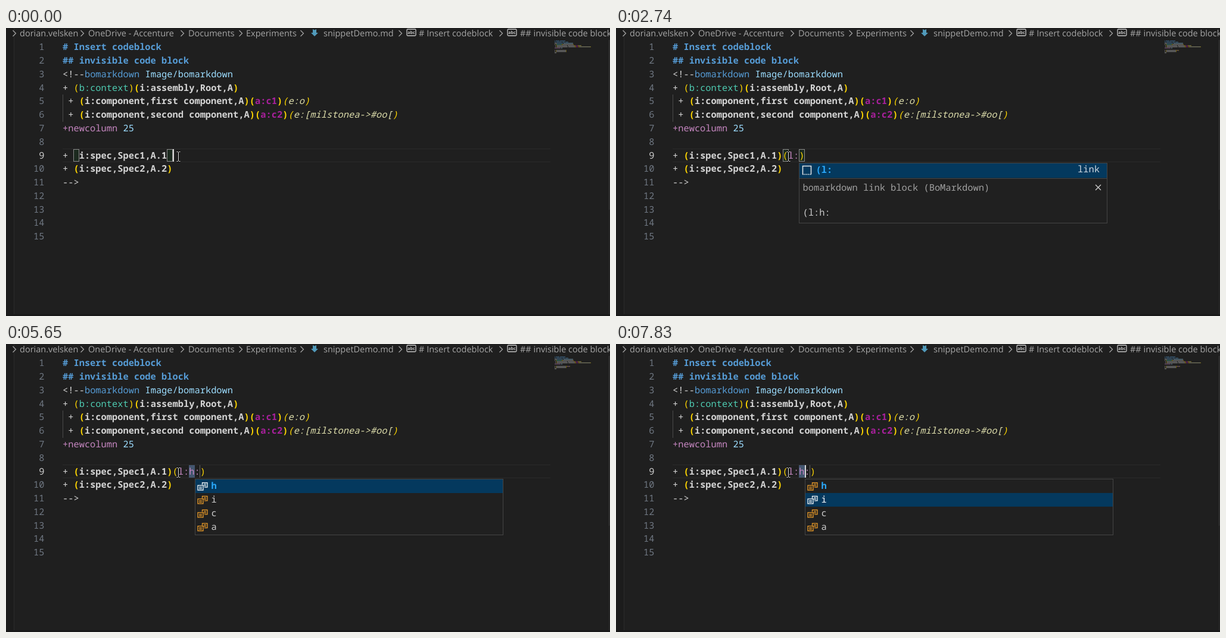
An HTML page for the animation above (8000 ms loop, 1014 px wide and 485 px high).

```html
<!DOCTYPE html>
<html lang="en">
<head>
<meta charset="utf-8">
<title>Snippet completion</title>
<style>
  html, body { margin: 0; width: 100%; height: 100%; overflow: hidden; background: #1f1f1f; }
  svg { display: block; }
  text { white-space: pre; text-rendering: geometricPrecision; }
  .code text { font: 15.38px "Noto Sans Mono", "DejaVu Sans Mono", monospace; }
  .code .b { font-weight: 700; }
  .code .i { font-style: italic; }
  .crumbs text { font: 14.5px "Open Sans", "Noto Sans", sans-serif; fill: #a6a6a6; }
  .crumbs .abc { font-size: 7px; font-weight: 700; fill: #c5c5c5; }
  .key text { font: 64px Lato, "Open Sans", sans-serif; fill: #f0f0f0; text-anchor: middle; }
</style>
</head>
<body>
<svg width="1014" height="485" viewBox="0 0 1014 485">
  <rect width="1014" height="485" fill="#1f1f1f"/>
  <rect width="13" height="485" fill="#1c1c1c"/>
  <path d="M13.5 0V482" stroke="#2b2b2b"/>
  <rect y="482" width="1014" height="3" fill="#191919"/>
  <path d="M1012.5 20V306" stroke="#3c3c3c"/>
  <path d="M1012.5 306V482" stroke="#292929"/>
  <g id="crumbs" class="crumbs"></g>
  <g id="page" class="code"></g>
  <g id="edit" class="code"></g>
  <g id="popup" class="code"></g>
  <g id="keys" class="key"></g>
</svg>
<script>
const LOOP = 8000, LEFT = 95, CHAR = 9.23, PITCH = 22.79;
const PALETTE = {
  text: '#d4d4d4', gold: '#ffd700', blue: '#569cd6', sky: '#9cdcfe', teal: '#4ec9b0',
  pink: '#c586c0', plum: '#a8209c', cream: '#dcdcaa'
};

// Tokens are [text, colour, optional class].
const gold = (s, cls = 'b') => [s, 'gold', cls];
const item = s => [gold('('), [s, 'text', 'b'], gold(')')];
const anchor = s => [gold('('), [s, 'plum', 'b'], gold(')')];
const edge = s => [gold('(', 'i'), [s, 'cream', 'i'], gold(')', 'i')];

const LINES = [
  [['# Insert codeblock', 'blue', 'b']],
  [['## invisible code block', 'blue', 'b']],
  [['<!--', 'text'], ['bomarkdown ', 'blue'], ['Image/bomarkdown', 'sky']],
  [['+ ', 'text'], gold('(', ''), ['b:context', 'teal'], gold(')', ''), ...item('i:assembly,Root,A')],
  [[' + ', 'text'], ...item('i:component,first component,A'), ...anchor('a:c1'), ...edge('e:o')],
  [[' + ', 'text'], ...item('i:component,second component,A'), ...anchor('a:c2'), ...edge('e:[milstonea->#oo[')],
  [['+newcolumn ', 'pink'], ['25', 'sky']],
  [],
  [['+ ', 'text'], ...item('i:spec,Spec1,A.1')],
  [['+ ', 'text'], ...item('i:spec,Spec2,A.2')],
  [['-->', 'text']],
  [], [], [], []
];
const ACTIVE = 8;

const STAGES = [
  { at: 0, typed: '', caret: 20, match: [2, 19] },
  { at: 250, typed: '()', caret: 21, match: [20, 21] },
  { at: 1630, typed: '(l)', caret: 22, match: [20, 22], list: 'link' },
  { at: 1900, typed: '(l:)', caret: 23, match: [20, 23], list: 'link' },
  { at: 4830, typed: '(l:h:)', caret: 24, match: [], list: 'kinds', row: 0 },
  { at: 6880, typed: '(l:h:)', caret: 24, match: [], list: 'kinds', row: 1 }
];
const BLINKS = [[810, 1370], [2460, 2890], [3450, 3860], [4420, 4830],
  [5250, 5780], [6340, 6740], [7290, 7830]];
// Each press: label, key width, end time, then [time, opacity] steps.
const PRESSES = [
  { label: '(', width: 42, end: 1090, steps: [[250, .25], [380, .65], [530, 1]] },
  { label: 'L', width: 52, end: 1900, steps: [[1630, .6], [1760, 1]] },
  { label: ':', width: 40, end: 2740, steps: [[1900, 1]] },
  { label: 'Tab', width: 121, end: 5650, steps: [[4830, .25], [4980, .65], [5120, 1]] },
  { label: '↓', width: 52, end: 7550, steps: [[6880, .62], [7010, 1]] }
];

const layer = id => document.getElementById(id);
const esc = s => s.replace(/&/g, '&amp;').replace(/</g, '&lt;').replace(/>/g, '&gt;');
const text = (x, y, s, fill, cls = '', extra = '') =>
  `<text x="${x}" y="${y}" class="${cls}" fill="${fill}" ${extra}>${esc(s)}</text>`;
const rect = (x, y, w, h, fill, extra = '') =>
  `<rect x="${x}" y="${y}" width="${w}" height="${h}" fill="${fill}" ${extra}/>`;
const line = (d, stroke, extra = '') => `<path d="${d}" fill="none" stroke="${stroke}" ${extra}/>`;
const column = n => LEFT + n * CHAR;
const baseline = row => 37.2 + row * PITCH;

function drawTokens(tokens, row, start = 0) {
  let col = start, out = '';
  for (const [s, color, cls] of tokens) {
    const lead = s.length - s.trimStart().length;
    out += text(column(col + lead), baseline(row), s.trim(), PALETTE[color], cls);
    col += s.length;
  }
  return out;
}

function drawMinimap(tokens, row, start = 0) {
  let col = start, out = '';
  for (const [s, color] of tokens) {
    for (const word of s.matchAll(/\S+/g))
      out += rect(921 + col + word.index, 21 + row * 2, word[0].length, 1.3, PALETTE[color], 'opacity=".45"');
    col += s.length;
  }
  return out;
}

function drawCrumbs() {
  const labels = [[23, 'dorian.velsken'], [138, 'OneDrive - Accenture'], [306, 'Documents'],
    [403, 'Experiments'], [533, 'snippetDemo.md'], [693, '# Insert codeblock'],
    [863, '## invisible code block']];
  const chevron = x => line(`M${x - 2.5} 4l5 5l-5 5`, '#a6a6a6', 'stroke-width="1.2"');
  const symbol = x => rect(x, 2, 15, 11, 'none', 'rx="1.5" stroke="#c5c5c5" stroke-width="1.3"') +
    text(x + 7.5, 10, 'abc', '#c5c5c5', 'abc', 'text-anchor="middle"');
  return labels.map(([x, s]) => text(x, 14, s, '#a6a6a6')).join('') +
    [14, 128, 296, 394, 497, 662, 831].map(chevron).join('') +
    '<path d="M515 2l3 1.5l3-1.5v6h3l-6 6l-6-6h3z" fill="#519aba"/>' + symbol(673) + symbol(842);
}

function drawPage() {
  const top = 203.5;
  let out = line(`M95 ${top}H914M95 ${top + 22}H914`, '#2a2a2a') + line('M95.5 112V158', '#4a4a4a');
  LINES.forEach((tokens, row) => {
    out += text(64.5, baseline(row), String(row + 1), row === ACTIVE ? '#cccccc' : '#6e7681', '', 'text-anchor="end"');
    out += drawTokens(tokens, row) + drawMinimap(tokens, row);
  });
  return out;
}

function drawEdit({ typed, caret, match }, caretOn) {
  const inner = typed.slice(1, -1);
  const tokens = typed ? [gold('(', ''), [inner, 'pink'], gold(')', '')] : [];
  let out = match.map(c => rect(Math.round(column(c)) + .5, 204.5, 9, 20, '#1c2a1f', 'stroke="#888"')).join('');
  if (inner.length > 2) out += rect(307, 204, 10, 21, '#43566f') + line('M325.5 204V225', '#626262');
  out += drawTokens(tokens, ACTIVE, 20) + drawMinimap(tokens, ACTIVE, 20);
  // Text cursor of the mouse
  const beam = 'M286.5 208.5h2l1 1l1-1h2M289.5 209V224M286.5 224.5h2l1-1l1 1h2';
  out += line(beam, '#111', 'stroke-width="3"') + line(beam, '#e4e4e4');
  if (caretOn) out += rect(Math.round(column(caret)), 204, 2, 21, '#d8d8d8');
  return out;
}

const frame = (x, h) => rect(x + .5, 227.5, 517, h, '#202020', 'stroke="#454545"');

function drawLink({ caret, typed }) {
  const x = Math.round(column(caret)), hit = typed.slice(0, -1);
  return frame(x, 101) + rect(x + 1, 228, 516, 24.5, '#04395e') + line(`M${x} 253.5h517`, '#454545') +
    line(`M${x + 6.5} 246V232.5h14V246`, '#e8e8e8', 'stroke-width="1.5"') +
    line(`M${x + 6} 246.5h15`, '#e8e8e8', 'stroke-width="1.5" stroke-dasharray="2 1.2"') +
    text(x + 28.5, 244, hit, '#2aaaff', 'b') +
    (hit.length < 3 ? text(x + 28.5 + 2 * CHAR, 244, ':', '#fff') : '') +
    text(x + 505, 243, 'link', '#d0d8e0', '', 'text-anchor="end"') +
    text(x + 6.5, 274, 'bomarkdown link block (BoMarkdown)', '#a0a0a0') +
    text(x + 6.5, 316, '(l:h:', '#cccccc') +
    line(`M${x + 498} 264l9 9m0-9l-9 9`, '#d0d0d0', 'stroke-width="1.3"');
}

function drawKinds({ row }) {
  const x = 317;
  let out = frame(x, 94);
  [...'hica'].forEach((name, i) => {
    const y = 228 + i * 22.9, on = i === row, ink = on ? '#ffffff' : '#ee9d28';
    if (on) out += rect(x + 1, y, 516, 23, '#04395e');
    out += line(`M${x + 12.5} ${y + 9}v-3.5h8.5v7.5h-5M${x + 5} ${y + 10}h9v8h-9zM${x + 15} ${y + 8}h4M${x + 15} ${y + 10.5}h4M${x + 7} ${y + 13}h5M${x + 7} ${y + 15.5}h5`,
      ink, 'stroke-width="1.25"');
    out += text(x + 27.5, y + 16, name, i ? (on ? '#ffffff' : '#cccccc') : '#2aaaff', i ? '' : 'b');
  });
  return out;
}

function drawKey(press, opacity) {
  const { label, width: w } = press, x = 489 - w / 2;
  const glyph = label === '↓'
    ? line('M488.5 326V369M478.5 359.5l10 10l10-10', '#f0f0f0', 'stroke-width="4.5"')
    : text(489, 371, label, '#f0f0f0');
  return `<g opacity="${opacity}">` + rect(0, 285, 1014, 118, '#000', 'opacity=".4"') +
    rect(x, 299, w, 89.5, '#4c4c4c', 'rx="5"') +
    rect(x, 297.5, w, 87, '#1e1e1e', 'rx="5" stroke="#6c6c6c"') + glyph + '</g>';
}

const last = (list, test) => list.filter(test).pop();
const cache = {};
function update(id, html) {
  if (cache[id] !== html) layer(id).innerHTML = cache[id] = html;
}

function render(t) {
  const stage = last(STAGES, s => s.at <= t);
  const caretOn = !BLINKS.some(([from, to]) => t >= from && t < to);
  const press = PRESSES.find(p => t >= p.steps[0][0] && t < p.end);
  update('edit', drawEdit(stage, caretOn));
  update('popup', stage.list === 'link' ? drawLink(stage) : stage.list ? drawKinds(stage) : '');
  update('keys', press ? drawKey(press, last(press.steps, s => s[0] <= t)[1]) : '');
}

update('crumbs', drawCrumbs());
update('page', drawPage());
const start = performance.now();
function tick() {
  render((performance.now() - start) % LOOP);
  requestAnimationFrame(tick);
}
tick();
</script>
</body>
</html>
```
